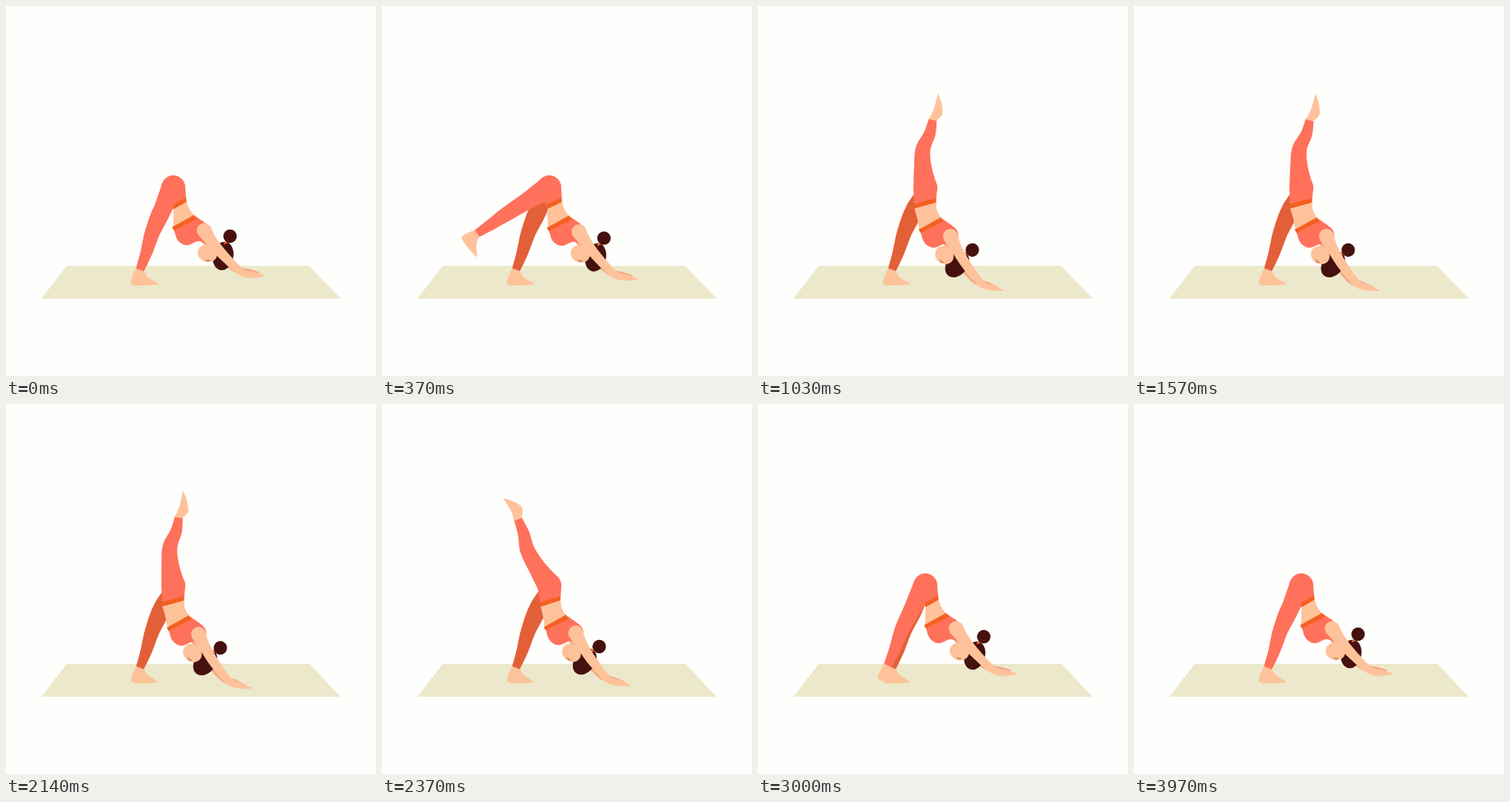
Write an HTML page with a canvas that moves like this. It is 450x450 px and loops after 4 s.

```html
<!DOCTYPE html>
<html lang="en">
<head>
<meta charset="utf-8">
<title>Yoga leg raise</title>
<style>
html, body { margin: 0; width: 100%; height: 100%; overflow: hidden; background: #fefefc; }
canvas { display: block; width: 450px; height: 450px; }
</style>
</head>
<body>
<canvas id="stage"></canvas>
<script>
const LOOP = 4000, RAD = Math.PI / 180;
const BG = '#fefefc', MAT = '#ece8cb', SKIN = '#fec29a', SHADE = '#f3a985';
const CORAL = '#ff715b', RUST = '#e25f38', BAND = '#f4601f', HAIR = '#45110e';
const HIP = [203.5, 220.5], HIP_R = 14.5, REST = 22, RAISE = 166;

const canvas = document.getElementById('stage');
const ctx = canvas.getContext('2d');
const dpr = window.devicePixelRatio || 1;
canvas.width = canvas.height = 450 * dpr;

const mix = (a, b, k) => a + (b - a) * k;
const mixPt = (p, q, k) => [mix(p[0], q[0], k), mix(p[1], q[1], k)];
const ramp = (t, from, to) => Math.max(0, Math.min(1, (t - from) / (to - from)));
const ease = (t, from, to) => (1 - Math.cos(Math.PI * ramp(t, from, to))) / 2;

// Point at a distance from p; 0 degrees is straight down, turning clockwise
const reach = (p, deg, d) => [p[0] - d * Math.sin(deg * RAD), p[1] + d * Math.cos(deg * RAD)];

// Smooth open curve, joined to the current path
function curve(p) {
  const n = p.length - 1;
  ctx.lineTo(...p[0]);
  for (let i = 0; i < n; i++) {
    const a = p[Math.max(0, i - 1)], b = p[i], c = p[i + 1], d = p[Math.min(n, i + 2)];
    ctx.bezierCurveTo(b[0] + (c[0] - a[0]) / 6, b[1] + (c[1] - a[1]) / 6,
      c[0] - (d[0] - b[0]) / 6, c[1] - (d[1] - b[1]) / 6, c[0], c[1]);
  }
}

function fill(color, ...curves) {
  ctx.beginPath();
  curves.forEach(curve);
  ctx.closePath();
  ctx.fillStyle = color;
  ctx.fill();
}

function poly(color, ...points) {
  ctx.beginPath();
  points.forEach(p => ctx.lineTo(...p));
  ctx.closePath();
  ctx.fillStyle = color;
  ctx.fill();
}

function oval(color, x, y, rx, ry = rx, tilt = 0) {
  ctx.beginPath();
  ctx.ellipse(x, y, rx, ry, tilt, 0, Math.PI * 2);
  ctx.fillStyle = color;
  ctx.fill();
}

function stroke(color, width, ...points) {
  ctx.beginPath();
  curve(points);
  ctx.strokeStyle = color;
  ctx.lineWidth = width;
  ctx.lineCap = 'butt';
  ctx.stroke();
}

// Tapered limb along [x, y, half width] joints
function limb(color, joints) {
  const side = s => joints.map(([x, y, w], i) => {
    const a = joints[Math.max(0, i - 1)], b = joints[Math.min(joints.length - 1, i + 1)];
    const dx = b[0] - a[0], dy = b[1] - a[1], k = s * w / Math.hypot(dx, dy);
    return [x - dy * k, y + dx * k];
  });
  fill(color, side(1), side(-1).reverse());
}

function drawFoot(ankle, angle, u) {
  const toeAngle = angle - 75 + 81 * u;
  const toe = reach(ankle, toeAngle, 29 + 4 * u * u * u);
  const heel = reach(ankle, toeAngle + 86 - 40 * u, 20 - 6 * u);
  const back = reach(ankle, angle + 90, 5), front = reach(ankle, angle - 90, 5);
  const sole = mixPt(ankle, mixPt(heel, toe, 0.5), 1.12);
  const instep = mixPt(mixPt(front, toe, 0.45), heel, 0.12);
  fill(SKIN, [back, heel, sole, toe], [toe, instep, front]);
}

function drawLeg(color, angle, u, top) {
  const length = 108 - 15 * u - 11 * u * u, bend = 11 * u - 3;
  const joint = (s, out, w) => [...reach(reach(HIP, angle, length * s), angle - 90, bend * out), w];
  drawFoot(reach(HIP, angle, length), angle, u);
  limb(color, [joint(0, 0, top), joint(0.28, 0.7, 10.8), joint(0.56, 1, 9),
    joint(0.8, 0.2, 7), joint(1, 0, 5)]);
}

function drawHead(lean, turn) {
  ctx.save();
  ctx.translate(245 - 18.5 * lean, 301 + 2 * lean);
  ctx.rotate((27 * lean + turn) * RAD);
  oval(HAIR, 19, 3, 12.5, 17.5, 0.2);
  oval(SKIN, 0, 0, 12, 10.5, 0.3);
  stroke(BAND, 2.5, [20, -12], [24, -14]);
  oval(HAIR, 27.5, -21, 8.2);
  stroke('#9a4a2c', 0.9, [-2, 7], [0, 9], [3, 8]);
  ctx.restore();
}

function drawArm(color, lean, dx, dy) {
  ctx.save();
  ctx.translate(241 - 7 * lean + dx, 273 + 7 * lean + dy);
  ctx.rotate(9 * lean * RAD);
  oval(color, 0, 0, 9);
  limb(color, [[0, 0, 9], [10.5, 15, 6.7], [26.5, 33.5, 5.7], [46, 51, 4.4], [60, 54, 3.5], [74, 55, 0.5]]);
  ctx.restore();
}

function drawChest(dx, dy) {
  ctx.save();
  ctx.translate(dx, dy);
  fill(CORAL, [[204, 271], [209, 285], [220, 291], [234, 286], [246, 289], [250, 276], [246, 267], [231, 256]]);
  poly(BAND, [202, 269], [204, 273], [232, 259], [229, 254]);
  ctx.restore();
}

function draw(t) {
  const drop = ease(t, 2080, 3090);
  const u = ease(t, 50, 1100) - 0.012 * ramp(t, 1100, 2080) * (1 - drop) - drop;
  const angle = REST + RAISE * u;
  const lean = ease(t, 60, 1080) - ease(t, 2080, 3030);
  const turn = 6 * (ease(t, 2150, 2550) - ease(t, 3080, 3670)) - 3 * Math.sin(Math.PI * ramp(t, 200, 1030));

  ctx.setTransform(dpr, 0, 0, dpr, 0, 0);
  ctx.fillStyle = BG;
  ctx.fillRect(0, 0, 450, 450);
  poly(MAT, [74, 316], [369, 316], [407, 356], [43, 356]);

  drawArm(SHADE, lean, -7, -4);
  drawLeg(RUST, REST, 0, 6);
  drawHead(lean, turn);

  // Pelvis and belly stretch between the hip and the chest
  const shift = [-6.5 * lean, 3 * lean];
  const waistL = mixPt([204, 247], [190, 246], lean), waistR = mixPt([219.5, 238], [216.5, 239], lean);
  const chestL = [203 + shift[0], 271 + shift[1]], chestR = [230 + shift[0], 256 + shift[1]];
  const bellyL = mixPt(mixPt(waistL, chestL, 0.5), HIP, 0.04);
  const bellyR = mixPt(mixPt(waistR, chestR, 0.5), waistL, 0.08);
  fill(SKIN, [waistL, bellyL, chestL], [chestR, bellyR, waistR]);
  drawChest(...shift);

  drawLeg(CORAL, angle, u, HIP_R);
  oval(CORAL, ...HIP, HIP_R);
  poly(CORAL, [HIP[0] - HIP_R, HIP[1]], waistL, waistR, [HIP[0] + HIP_R, HIP[1]]);
  const up = ([x, y]) => [x - 1, y - 5];
  poly(BAND, waistL, waistR, up(waistR), up(waistL));
  drawArm(SKIN, lean, 0, 0);
}

function tick() {
  draw(performance.now() % LOOP);
  requestAnimationFrame(tick);
}
tick();
</script>
</body>
</html>
```
